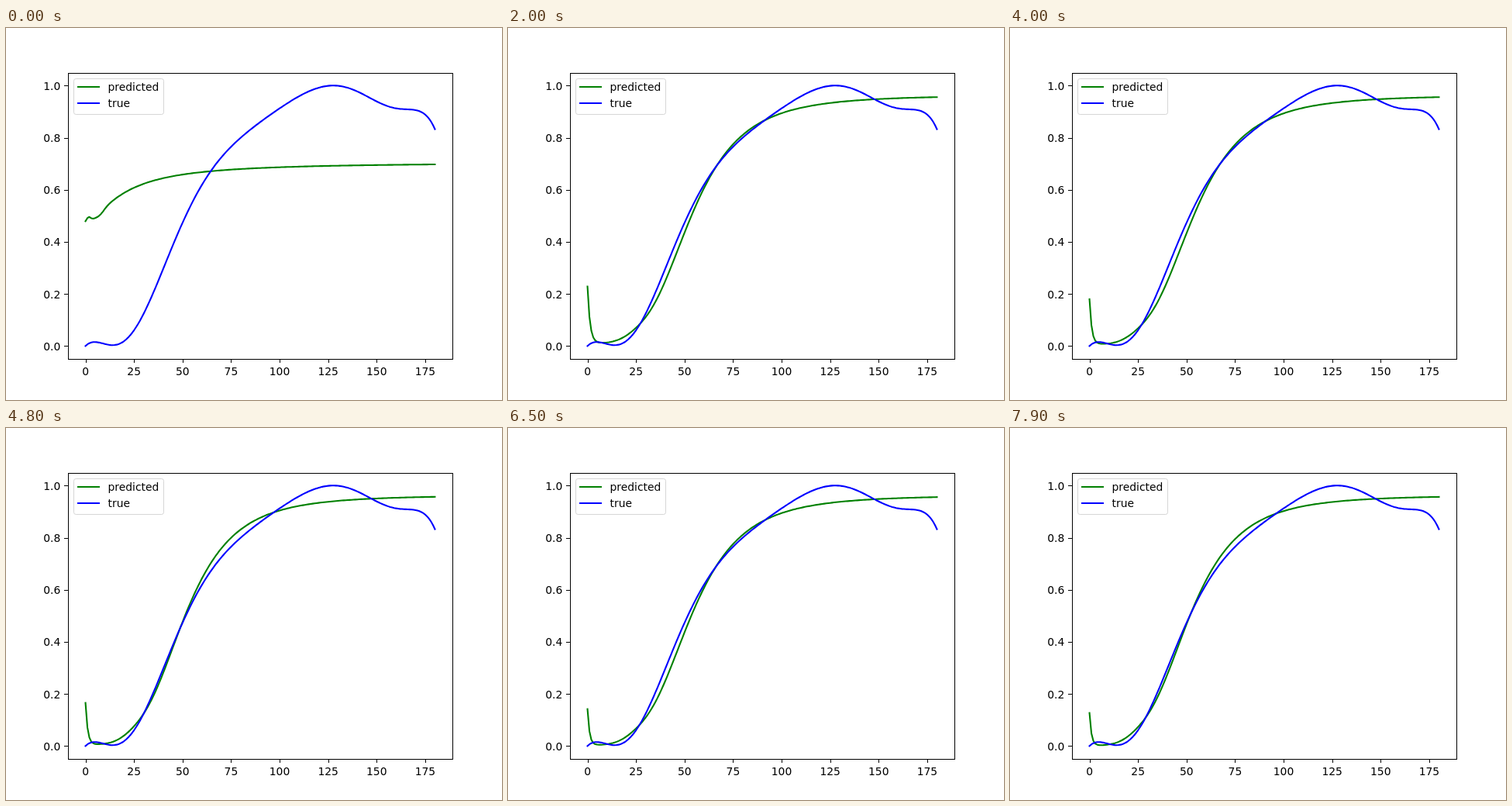
Recreate the animation shown at these times as an HTML page. Size 640 by 480 pixels, loop 8000 ms.

```html
<!DOCTYPE html>
<html lang="en">
<head>
<meta charset="utf-8">
<title>Curve fitting</title>
<style>
  html, body { margin: 0; width: 100%; height: 100%; overflow: hidden; background: #fff; }
  svg { display: block; width: 640px; height: 480px; }
  text { font: 13.889px "DejaVu Sans", sans-serif; fill: #000; }
  .axis { fill: none; stroke: #000; stroke-width: 1; }
  .curve { fill: none; stroke-width: 2.083; stroke-linecap: square; stroke-linejoin: round; }
  .key { stroke-width: 2; stroke-linecap: square; }
  .green { stroke: #008000; }
  .blue { stroke: #00f; }
</style>
</head>
<body>
<svg id="plot" viewBox="0 0 640 480" xmlns="http://www.w3.org/2000/svg"></svg>
<script>
const STEP = 100, STEPS = 80, LAST = 180;
const plot = document.getElementById('plot');

const px = x => 102.545 + x * 450.909 / LAST;
const py = v => 410.4 - 336 * v;
const snap = p => Math.floor(p + .5) + .5;
const bump = (x, mid, width) => Math.exp(-(((x - mid) / width) ** 2));
const hill = (x, half, power) => 1 / (1 + (half / x) ** power);

function add(tag, attrs, text) {
  const el = document.createElementNS('http://www.w3.org/2000/svg', tag);
  for (const k in attrs) el.setAttribute(k, attrs[k]);
  if (text) el.textContent = text;
  return plot.appendChild(el);
}

function toPath(curve) {
  const pts = [];
  for (let x = 0; x <= LAST; x++) pts.push(px(x).toFixed(2) + ' ' + py(curve(x)).toFixed(2));
  return 'M' + pts.join('L');
}

// The true curve is one polynomial, given by its values at Chebyshev nodes
const KNOTS = [0, .014, .0047, .076, .387, .694, .86, .972, .992, .927, .908, .8735, .833];

function truth(x) {
  const n = KNOTS.length - 1;
  let top = 0, bottom = 0;
  for (let i = 0; i <= n; i++) {
    const gap = x - LAST / 2 * (1 - Math.cos(Math.PI * i / n));
    if (Math.abs(gap) < 1e-9) return KNOTS[i];
    const w = (i % 2 ? -1 : 1) * (i % n ? 1 : .5) / gap;
    top += w * KNOTS[i];
    bottom += w;
  }
  return top / bottom;
}

const untrained = x => .471 + .235 * hill(x, 20, 1.5)
  + .02 * bump(x, 1.5, 1.6) - .0115 * bump(x, 7.5, 3);

// Training: the first value shrinks while the midpoint swings to and fro
function predicted(k) {
  const first = 1 / (3.185 + .0593 * k);
  const floor = .014, drop = (.257 - first) * .09;
  const spike = first - floor + drop;
  const reach = .65 + 2.85 * first;
  const half = 51.75 + 1.25 * Math.cos(2 * Math.PI * (k - 40) / 5.09);
  const old = Math.exp(-1.2 * k);
  return x => {
    const trained = floor + .949 * hill(x, half, 4) + .012 * bump(x, 25, 9)
      + spike * Math.exp(-x / reach) - drop * bump(x, 0, 25);
    return untrained(x) * old + trained * (1 - old);
  };
}

// Ticks and labels
for (let x = 0; x <= 175; x += 25) {
  add('path', { class: 'axis', d: `M${snap(px(x))} 428v4` });
  add('text', { x: px(x), y: 448, 'text-anchor': 'middle' }, String(x));
}
for (let i = 0; i <= 5; i++) {
  const y = py(i / 5);
  add('path', { class: 'axis', d: `M80 ${snap(y)}h-5` });
  add('text', { x: 70.3, y: Math.round(y + 5.3), 'text-anchor': 'end' }, (i / 5).toFixed(1));
}

const green = add('path', { class: 'curve green' });
add('path', { class: 'curve blue', d: toPath(truth) });
add('rect', { class: 'axis', x: 80.5, y: 58.5, width: 496, height: 369 });

// Legend
add('rect', { x: 87.5, y: 65.5, width: 116, height: 46, rx: 2.78,
  fill: '#fff', 'fill-opacity': .8, stroke: '#ccc', 'stroke-opacity': .8 });
[['green', 'predicted', 76], ['blue', 'true', 97]].forEach(([name, label, y]) => {
  add('path', { class: 'key ' + name, d: `M93 ${y}h27` });
  add('text', { x: 131.5, y: y + 5 }, label);
});

const frames = Array.from({ length: STEPS }, (_, k) => toPath(predicted(k)));
let shown = -1;
function draw() {
  const k = Math.floor(performance.now() / STEP) % STEPS;
  if (k !== shown) green.setAttribute('d', frames[shown = k]);
  requestAnimationFrame(draw);
}
draw();
</script>
</body>
</html>
```
